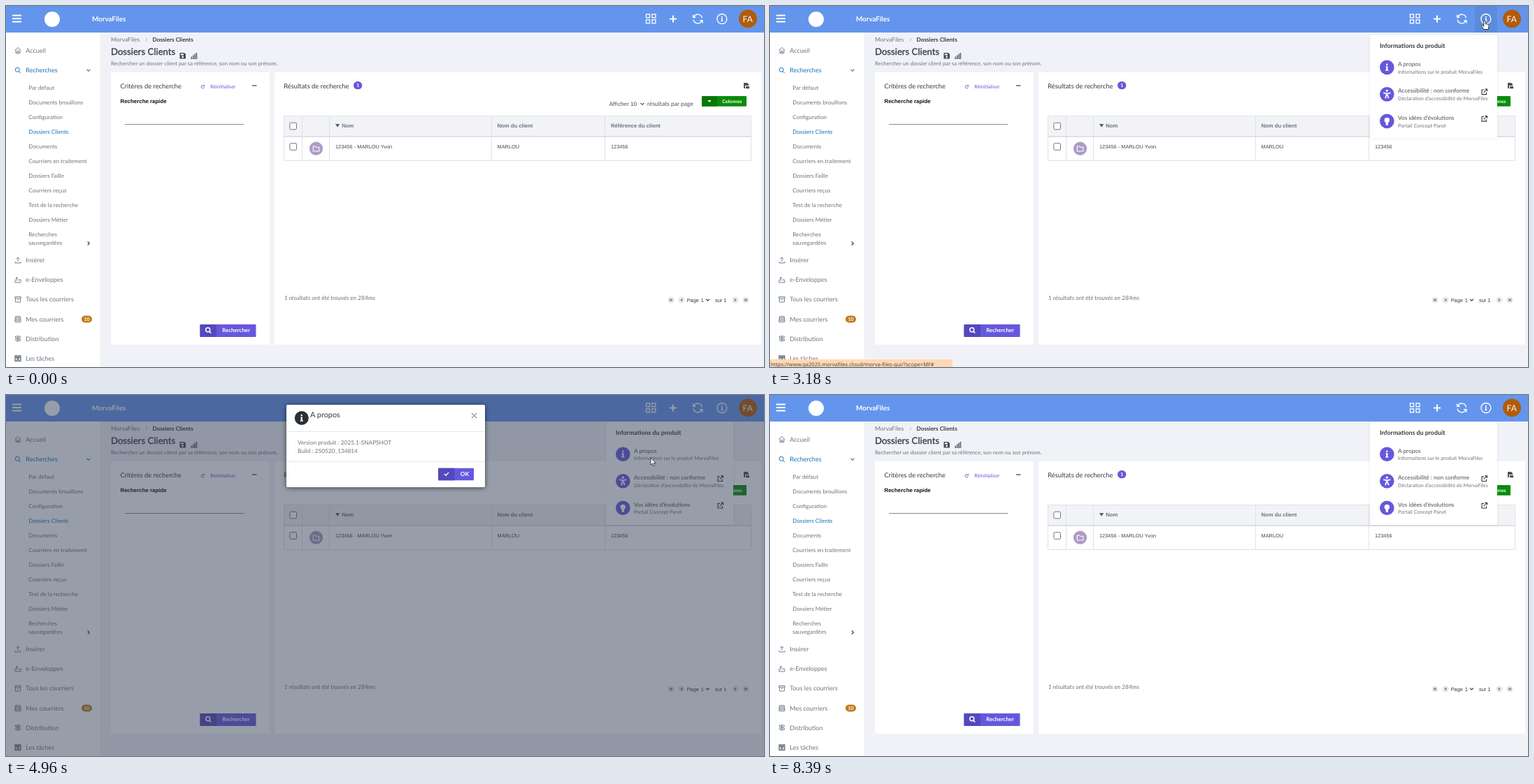
Recreate the animation shown at these times as an HTML page. Size 1084 px wide and 517 px high, loop 9320 ms.

```html
<!DOCTYPE html>
<html lang="fr">
<head>
<meta charset="utf-8">
<title>MorvaFiles</title>
<style>
html, body { margin: 0; width: 100%; height: 100%; overflow: hidden; background: #f1f2f7; }
svg { display: block; width: 1084px; height: 517px; }
text { font-family: Lato, "Open Sans", sans-serif; text-rendering: geometricPrecision; white-space: pre; }
.sans { font-family: "Liberation Sans", Arial, sans-serif; }
.url { font-family: "Noto Sans", sans-serif; }
.b { font-weight: 700; }
.i { font-style: italic; }
.title { stroke: #343a40; stroke-width: .3px; }
</style>
</head>
<body>
<svg id="stage" viewBox="0 0 1084 517"></svg>
<script>
const GREY = '#6c757d', DARK = '#343a40', BLUE = '#1272b0', VIOLET = '#6658dd', DEEP = '#5448bd';

// y is the middle of the line of text
const text = (x, y, size, str, fill = GREY, cls = '') =>
  `<text x="${x}" y="${y + size * .34}" font-size="${size}" fill="${fill}" class="${cls}">${str}</text>`;
const rect = (x, y, w, h, fill, more = '') =>
  `<rect x="${x}" y="${y}" width="${w}" height="${h}" fill="${fill}" ${more}/>`;
const disc = (x, y, r, fill) => `<circle cx="${x}" cy="${y}" r="${r}" fill="${fill}"/>`;
const line = (d, color = GREY, w = 1, more = '') =>
  `<path d="${d}" fill="none" stroke="${color}" stroke-width="${w}" ${more}/>`;
const fill = (d, color) => `<path d="${d}" fill="${color}"/>`;
const at = (x, y, body) => `<g transform="translate(${x} ${y})">${body}</g>`;
const layer = (id, body) => `<g id="${id}">${body}</g>`;

const lens = (color, w) => line('M3 0a3 3 0 1 1-6 0a3 3 0 1 1 6 0M2 2.2L4.6 4.8', color, w);
const infoMark = (color, k = 1) =>
  `<g transform="scale(${k})">` + disc(0, -4, 1.3, color) + fill('M-1.7-1.6H1.1V3.3H2V4.8H-2V3.3H-1.1V-.2H-1.7z', color) + '</g>';
const reload = (color, w) =>
  line('M6.2-1.2A6.3 6.3 0 0 0-5.6-3M-6.2 1.2A6.3 6.3 0 0 0 5.6 3M-6.6-6V-2.2H-2.8M6.6 6V2.2H2.8', color, w);
const chevron = (x, y, color = DARK) => line(`M${x - 2.5} ${y - 1.2}l2.5 2.5 2.5-2.5`, color, 1.1);
const outLink = line('M-.5-2.8H-3.5V3.8H3V.8M.8-3.8H4V-.6M4-3.8L-.8 1', DARK, 1.1);

function sidebar() {
  const icons = [
    'M-4-.3L0-4 4-.3M-3-1V4H3V-1M-1 4V1H1V4', '',
    'M0 2V-4M-2.6-1.6L0-4.2 2.6-1.6M-4 2V4H4V2',
    'M-2.5 0H-4V4H4V0H2.5M-1.5 1.5V-3.5M-3-2L-1.5-3.7 0-2M1.5-1V1.5',
    'M-4.2-3.6H4.2V-1.4H-4.2zM-3.5-1.4V4H3.5V-1.4M-1.3.6H1.3',
    'M-3.2-4H3.2L4 0V4H-4V0zM-4 0H4M-4 2H4M-3.5-2H3.5',
    'M0-4.5V4.5M-3.5-3.5H3L4-2.3 3-1.2H-3.5zM3.5.6H-3L-4 1.8-3 2.8H3.5z',
    'M-3.8-3.5H-1V4H-3.8zM1-3.5H3.8V4H1zM-1-1H1M-3.8-1.2H-1M1-1.2H3.8'];
  const names = ['Accueil', 'Recherches', 'Insérer', 'e-Enveloppes', 'Tous les courriers',
    'Mes courriers', 'Distribution', 'Les tâches'];
  const rows = [63.5, 92, 364, 392, 420, 448.5, 476.5, 504.5];
  const subs = ['Par défaut', 'Documents brouillons', 'Configuration', 'Dossiers Clients', 'Documents',
    'Courriers en traitement', 'Dossiers Faille', 'Courriers reçus', 'Test de la recherche',
    'Dossiers Métier', 'Recherches'];
  return rect(0, 38, 134.5, 479, '#fff') +
    names.map((n, i) => text(28.3, rows[i], 9, n, i == 1 ? BLUE : GREY) +
      at(17, rows[i], i == 1 ? at(-.7, -.7, lens(BLUE, 1)) : line(icons[i], GREY, i == 7 ? 1.5 : .9))).join('') +
    subs.map((n, i) => text(32.3, 117 + i * 21, 8.15, n, i == 3 ? BLUE : GREY)).join('') +
    text(32.3, 339, 8.15, 'sauvegardées') + chevron(118, 92, BLUE) +
    line('M116.8 337.5l2.5 2.5-2.5 2.5', DARK, 1.1) +
    rect(108, 443.5, 15, 10, '#c17a1a', 'rx="5"') + text(111.4, 448.5, 7, '10', '#fff', 'b');
}

function header() {
  const squares = [[915, 11.5], [923.5, 11.5], [915, 19.5], [923.5, 19.5]];
  return rect(0, 0, 1084, 38, '#6495ed') + layer('hover', rect(1008, 0, 32, 38, 'rgba(0,0,0,.07)')) +
    line('M9 13.5H22M9 18H22M9 22.5H22', '#fff', 2) + disc(66, 19, 11, '#fff') +
    text(123, 18.5, 9.8, 'MorvaFiles', '#fff', 'b') +
    squares.map(([x, y]) => rect(x + .5, y + .3, 5, 5, 'none', 'stroke="#fff" stroke-width="1.3"')).join('') +
    line('M949 18.5H959M954 13.5V23.5', '#fff', 2) + at(989.3, 18.5, reload('#fff', 1.4)) +
    line('M1030.9 18.5a7 7 0 1 1-14 0a7 7 0 1 1 14 0', '#fff', 1.3) + at(1023.9, 18.5, infoMark('#fff', .75)) +
    disc(1061, 18.3, 13, '#b15c0b') + text(1053.6, 18.5, 12, 'FA', '#fff');
}

function criteria() {
  return rect(150, 95, 227, 390, '#fff', 'rx="2"') +
    text(163.5, 115, 9.3, 'Critères de recherche', DARK) +
    at(281.3, 115.7, line('M1.9-1.1A2.2 2.2 0 1 0 2.1.7M2.4-2.8V-.9H.5', VIOLET, .9)) +
    text(292.3, 115.7, 7.15, 'Réinitialiser', VIOLET) + line('M352 114H358.5', DARK, 1.2) +
    text(163.5, 136.3, 7.9, 'Recherche rapide', '#111', 'sans b') + line('M170 169.5H340.5', '#8c8c8c') +
    rect(277.5, 456, 80, 18, VIOLET, 'rx="1"') + rect(277.5, 456, 23.5, 18, DEEP, 'rx="1"') +
    at(288.7, 463.7, lens('#fff', 1.5)) + text(309.3, 464.7, 7.9, 'Rechercher', '#fff', 'b');
}

function results() {
  const box = y => rect(405.9, y, 9.6, 9.6, '#fff', 'rx="1.5" stroke="#767676"');
  const pager = (x, d) => disc(x, 421, 4.5, '#e6e7ea') + at(x, 421, fill(d, '#777'));
  return rect(384, 95, 696, 390, '#fff', 'rx="2"') +
    text(397.3, 115, 9.4, 'Résultats de recherche', DARK) +
    rect(497, 108, 12.3, 11.3, VIOLET, 'rx="5.6"') + text(501.2, 113.6, 7, '1', '#fff', 'b') +
    fill('M1055 110H1060L1062 112V114H1057V118H1055zM1058 115H1063V118.3H1058z', '#4b525a') +
    text(862.5, 140, 8.2, 'Afficher', '#495057') + text(893, 140.2, 8, '10', DARK, 'sans') + chevron(910, 140) +
    text(917, 140, 8.5, 'résultats par page', '#495057') +
    rect(995, 129, 64, 14.7, '#0a8c0a', 'rx="1"') + rect(995, 129, 22, 14.7, '#067706', 'rx="1"') +
    fill('M1003.3 135H1008.7L1006 138z', '#fff') + text(1024.3, 136.5, 6.8, 'Colonnes', '#fff', 'b') +
    rect(397.5, 157.5, 668, 29.5, '#f2f3f6') +
    line('M397.5 157.5H1065.5V221.5H397.5zM423.5 157.5V221.5M462.5 157.5V221.5M694.5 157.5V221.5M856.5 157.5V221.5', '#dee2e6') +
    line('M397.5 187H1065.5', '#d6dade', 1.3) + box(167.2) + box(196.7) +
    fill('M471 169H477.2L474.1 173.7z', '#555c64') +
    text(480.3, 171.8, 7.7, 'Nom', GREY, 'sans b') + text(702.5, 171.8, 7.7, 'Nom du client', GREY, 'sans b') +
    text(865, 171.8, 7.7, 'Référence du client', GREY, 'sans b') +
    disc(443.5, 204.2, 9.6, '#ad9bc6') + line('M439.3 201H442.5L443.6 202.3H447.8V208H439.3z', '#fff', 1.1) +
    text(471, 201, 7.4, '123456 - MARLOU Yvon', '#41474d', 'sans') +
    text(702.5, 201, 7.4, 'MARLOU', '#41474d', 'sans') + text(865, 201, 7.4, '123456', '#41474d', 'sans') +
    text(397.8, 418.5, 8.55, '1 résultats ont été trouvés en 284ms', GREY, 'i') +
    pager(951, 'M-2-2H-1.2V2H-2zM1.6-2.2V2.2L-1.2 0z') + pager(966, 'M1.2-2.2V2.2L-1.5 0z') +
    pager(1043, 'M-1.2-2.2V2.2L1.5 0z') + pager(1058, 'M2-2H1.2V2H2zM-1.6-2.2V2.2L1.2 0z') +
    text(973.7, 421, 7.4, 'Page', DARK, 'sans') + text(993.8, 421, 7.4, '1', DARK, 'sans') + chevron(1003.5, 420.8) +
    text(1014, 421, 7.4, 'sur 1', DARK, 'sans');
}

function page() {
  return rect(0, 0, 1084, 517, '#f1f2f7') + sidebar() + header() +
    text(150, 48.2, 8.5, 'MorvaFiles') + line('M199.8 46l2 2.2-2 2.2', '#9aa1a8', .8) +
    text(209.5, 48.4, 8.2, 'Dossiers Clients', DARK, 'b') +
    text(150, 65.7, 13.15, 'Dossiers Clients', DARK, 'title') +
    fill('M248.5 67H255L257 69V75.5H248.5zM250 68.2V70.4H254V68.2z', '#444b53') + disc(252.7, 73, 1.4, '#f1f2f7') +
    line('M265.3 75V72.5M267.8 75V70.5M270.2 75V68.5M272.5 75V67', '#555c64', 1.5) + line('M264 75.5H273.5', '#555c64', .7) +
    text(150, 82.2, 7.73, 'Rechercher un dossier client par sa référence, son nom ou son prénom.') +
    criteria() + results();
}

function popup() {
  const person = disc(0, -5, 1.6, '#fff') + line('M-5-2L-1.2-1H1.2L5-2M0-1V2M-.8 1L-2.3 6M.8 1L2.3 6', '#fff', 1.8);
  const bulb = disc(0, -1.3, 3.7, '#fff') + rect(-1.7, 1, 3.4, 5, '#fff', 'rx="1"');
  const items = [
    [infoMark('#fff'), 'A propos', 'Informations sur le produit MorvaFiles'],
    [person, 'Accessibilité : non conforme', 'Déclaration d’accessibilité de MorvaFiles'],
    [bulb, 'Vos idées d’évolutions', 'Portail Concept Panel']];
  const item = ([icon, name, note], i) => at(882.3, 84.7 + i * 38.5,
    disc(0, 0, 10.3, VIOLET) + icon + text(15.7, -4.7, 8.3, name, '#495057') +
    text(15.7, 6.2, 7.25, note) + (i ? at(139.2, -3.5, outLink) : ''));
  return rect(858, 38, 182, 148, '#fff', 'rx="2" filter="url(#soft)"') +
    text(872, 54.2, 8.85, 'Informations du produit', DARK, 'b') + items.map(item).join('');
}

function modal() {
  return rect(401, 14, 284, 118, '#fff', 'rx="2" filter="url(#strong)"') +
    disc(422.8, 33, 10, '#2b3037') + at(422.8, 33, infoMark('#fff')) +
    text(435, 28.7, 10.9, 'A propos', DARK) + line('M666 26l7 7M673 26l-7 7', '#555', 1) +
    line('M401 52.5H685M401 95.5H685', '#e3e6ea') +
    text(417, 68, 8.25, 'Version produit : 2025.1-SNAPSHOT') + text(417, 79.8, 8.25, 'Build : 250520_134814') +
    rect(618, 104.7, 51, 17.6, VIOLET, 'rx="1"') + rect(618, 104.7, 23.5, 17.6, DEEP, 'rx="1"') +
    layer('press', rect(618, 104.7, 51, 17.6, '#483fc2', 'rx="1"')) +
    layer('glow', rect(617, 103.7, 53, 19.6, '#483fc2', 'rx="2" stroke="#7468f0" stroke-width="1.4" filter="url(#focus)"')) +
    line('M626.8 113l2.3 2.3 4-4.4', '#fff', 1.3) + text(649.8, 113.4, 8.3, 'OK', '#fff', 'b');
}

const shadow = (id, blur, dy, alpha, color = '#111') =>
  `<filter id="${id}" x="-20%" y="-30%" width="140%" height="160%"><feDropShadow dx="0" dy="${dy}" stdDeviation="${blur}" flood-color="${color}" flood-opacity="${alpha}"/></filter>`;

const stage = document.getElementById('stage');
stage.innerHTML = '<defs>' + shadow('soft', 1.5, .5, .1) + shadow('strong', 3.5, 1, .6) +
  shadow('focus', 1.3, 0, .8, VIOLET) + '</defs>' +
  page() + layer('popup', popup()) +
  layer('status', rect(-4, 506, 265, 15, '#ffd9b3', 'rx="3"') +
    text(1, 513.6, 7.5, 'https://www.qa2025.morvafiles.cloud/morva-files-gui/?scope=MF#', '#4a4a4a', 'url')) +
  layer('dim', rect(0, 0, 1084, 517, '#323f55', 'fill-opacity=".5"')) + layer('modal', modal()) +
  layer('cursor',
    layer('ring', disc(0, 1, 8, 'rgba(236,216,50,.78)')) +
    layer('arrow', '<path d="M0 0V10.2L2.3 8 3.9 11.6 5.6 10.8 4 7.4H7.2z" fill="#fff" stroke="#222" stroke-width=".8"/>') +
    layer('hand', '<path d="M-1.2 2.2C-1.2.5 1.2.5 1.2 2.2V6L5 6.8C6 7 6.3 7.8 6.1 8.7L5.2 14H-1.2L-4.3 9.5C-4.8 8.2-3.3 7.6-2.5 8.4L-1.2 9.6z" fill="#fff" stroke="#222" stroke-width=".9"/>'));

// time, x, y of the pointer tip
const path = [
  [610, 689, 338], [820, 776, 290], [1070, 764, 250], [1220, 764, 250], [1380, 758, 259], [1700, 758, 259],
  [2220, 1040, 28], [2330, 1040, 28], [2550, 1038, 21], [2700, 1038, 21], [2860, 1022, 19.5], [3640, 1022, 19.5],
  [4180, 922, 90], [6350, 922, 90], [6950, 656, 113], [7229, 656, 113], [7230, 655, 114], [8310, 655, 114]];

const clamp = v => Math.max(0, Math.min(1, v));
const ramp = (t, a, b) => clamp((t - a) / (b - a));
const within = (t, ...spans) => spans.some(([a, b]) => t >= a && t < b);
const el = id => document.getElementById(id);
const show = (id, v) => { el(id).style.display = v ? '' : 'none'; el(id).style.opacity = +v; };
const move = (id, x, y) => el(id).setAttribute('transform', `translate(${x} ${y})`);

function pointer(t) {
  const i = Math.max(1, path.findIndex(k => k[0] > t));
  const [a, x0, y0] = path[i - 1], [b, x1, y1] = path[i];
  const u = ramp(t, a, b), e = u * u * (3 - 2 * u);
  return [x0 + (x1 - x0) * e, y0 + (y1 - y0) * e];
}

function draw(t) {
  const visible = within(t, [610, 8310]);
  show('cursor', visible);
  if (visible) move('cursor', ...pointer(t));
  const hand = within(t, [2150, 3720], [6880, 7230]);
  show('hand', hand);
  show('arrow', !hand);
  show('ring', within(t, [3020, 3100], [4640, 4720], [7060, 7230]));

  const onInfo = within(t, [2780, 3720]);
  show('hover', onInfo);
  show('status', onInfo);

  show('popup', t < 3100 ? 0 : ramp(t, 3040, 3170));
  move('popup', 0, 8 * (1 - ramp(t, 3060, 3260)));

  const open = t < 7230 ? ramp(t, 4680, 4950) : 0;
  show('dim', open);
  show('modal', open);
  move('modal', 0, -14 * (1 - open));
  show('press', within(t, [6900, 7230]));
  show('glow', within(t, [7060, 7230]));
}

function tick() {
  draw(performance.now() % 9320);
  requestAnimationFrame(tick);
}
tick();
</script>
</body>
</html>
```
